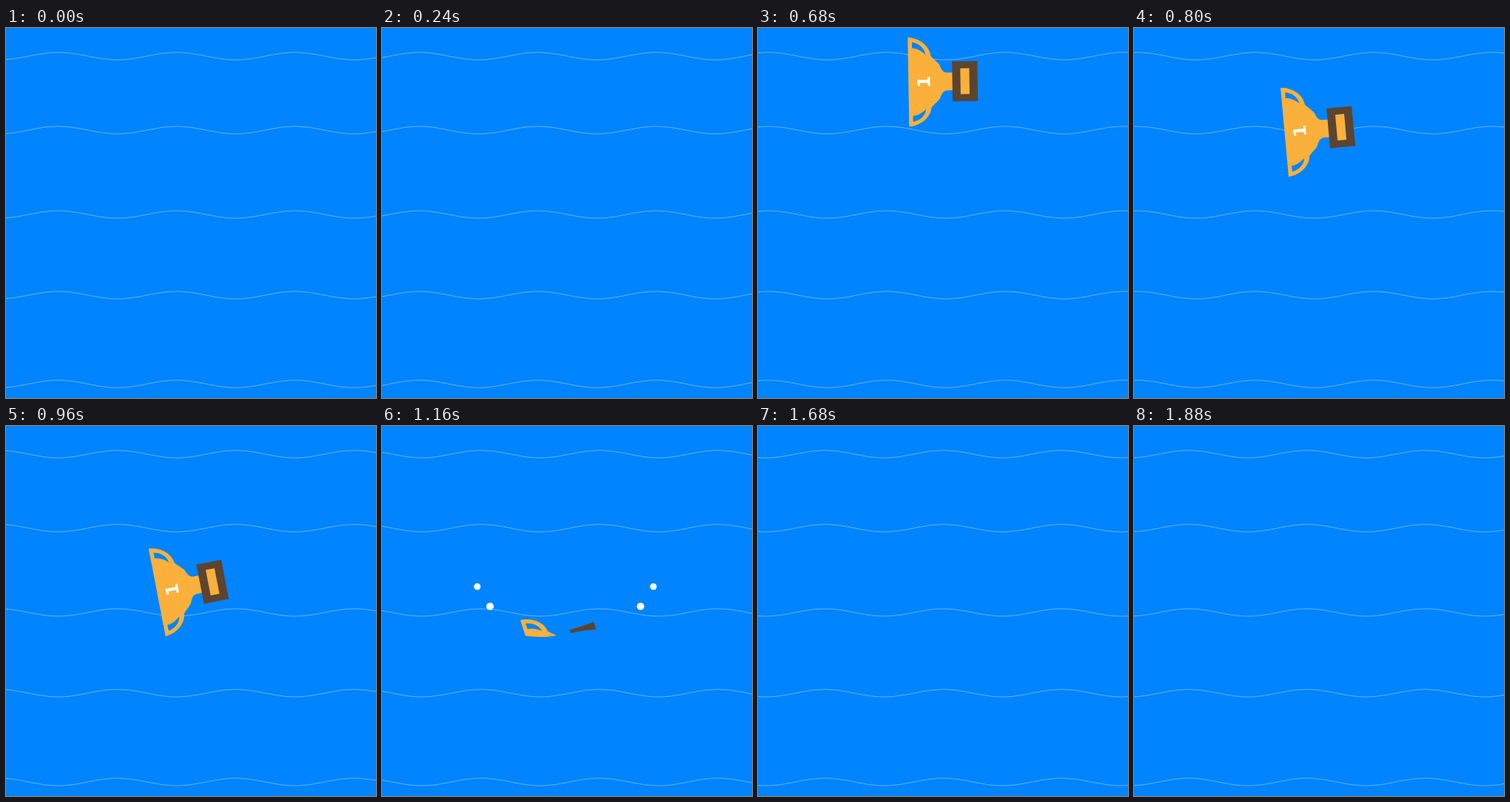
An HTML page for the animation above (1920 ms loop, 500 px wide and 500 px high).

```html
<!DOCTYPE html>
<html lang="en">
<head>
<meta charset="utf-8">
<title>Trophy splash</title>
<style>
  html, body { margin: 0; width: 100%; height: 100%; overflow: hidden; background: #0084ff; }
  svg { display: block; width: 100vw; height: 100vh; }
  .line { fill: none; stroke: #fff; stroke-opacity: .4; stroke-width: 1; }
  .gold { fill: #fbb03b; }
  .wood { fill: #5c4430; }
  text { font: bold 23.5px "DejaVu Sans", sans-serif; fill: #fff; text-anchor: middle; }
</style>
</head>
<body>
<svg viewBox="0 0 500 500">
  <g id="back"></g>
  <g id="trophy">
    <path class="gold" fill-rule="evenodd" d="M-60.3-47H60.3C60-35 51-18 34.5-16.2
      C29-11 27-8 23-5 C17-2 12-1 12 6 V14 H-12 V6
      C-12-1 -17-2 -23-5 C-27-8 -29-11 -34.5-16.2 C-51-18 -60-35 -60.3-47Z
      M53.8-41.5H45.8C45.5-35 42-29 37-23.5C46-25 52-32 53.8-41.5Z
      M-53.8-41.5H-45.8C-45.5-35 -42-29 -37-23.5C-46-25 -52-32 -53.8-41.5Z"/>
    <rect class="wood" x="-27" y="12.3" width="54" height="34.2"/>
    <rect class="gold" x="-17.5" y="23.3" width="35" height="12.1"/>
    <text x="0" y="-18">1</text>
  </g>
  <g id="drops" fill="#fff"></g>
  <path id="water" fill="#0084ff"/>
  <g id="front"></g>
</svg>
<script>
  const LOOP = 1920, STEP = 40, PERIOD = 160, CREST = 70.5;
  const $ = id => document.getElementById(id);

  function add(parent, tag, attrs) {
    const el = document.createElementNS("http://www.w3.org/2000/svg", tag);
    for (const key in attrs) el.setAttribute(key, attrs[key]);
    return parent.appendChild(el);
  }

  function wave(level) {
    let d = "";
    for (let x = -4; x <= 504 + PERIOD; x += 4) {
      const y = level - 5 * Math.cos(2 * Math.PI * (x - CREST) / PERIOD);
      d += (d ? "L" : "M") + x + " " + y.toFixed(2);
    }
    return d;
  }

  const waves = [38, 138, 252, 361, 481].map(level =>
    add($(level < 280 ? "back" : "front"), "path", { class: "line", d: wave(level) }));
  $("water").setAttribute("d", wave(280) + "V510H-4Z");
  waves.push($("water"));

  // Each drop flies on a parabola away from the point of impact.
  const drops = [[119, 68, 4.5], [101.7, 41.3, 5]].flatMap(([reach, height, r]) =>
    [-1, 1].map(side => ({ side, reach, height, el: add($("drops"), "circle", { r }) })));

  function draw(t) {
    const shift = -PERIOD * t / LOOP;
    for (const w of waves) w.setAttribute("transform", `translate(${shift} 0)`);

    const u = t - 800;
    const y = 136.7 + 0.5195 * u - 0.000143 * u * u;
    const angle = -95.2 - 0.0357 * u;
    $("trophy").setAttribute("transform", `translate(250.3 ${y}) rotate(${angle})`);

    const p = (t - 960) / 400;
    $("drops").style.display = p > 0 && p < 1.1 ? "" : "none";
    for (const { side, reach, height, el } of drops) {
      el.setAttribute("cx", 247.7 + side * (45 + (reach - 45) * 2 * p));
      el.setAttribute("cy", 285 - 4 * height * p * (1 - p));
    }
  }

  const start = performance.now();
  function tick() {
    const t = (performance.now() - start) % LOOP;
    draw(Math.floor(t / STEP) * STEP);
    requestAnimationFrame(tick);
  }
  tick();
</script>
</body>
</html>
```
